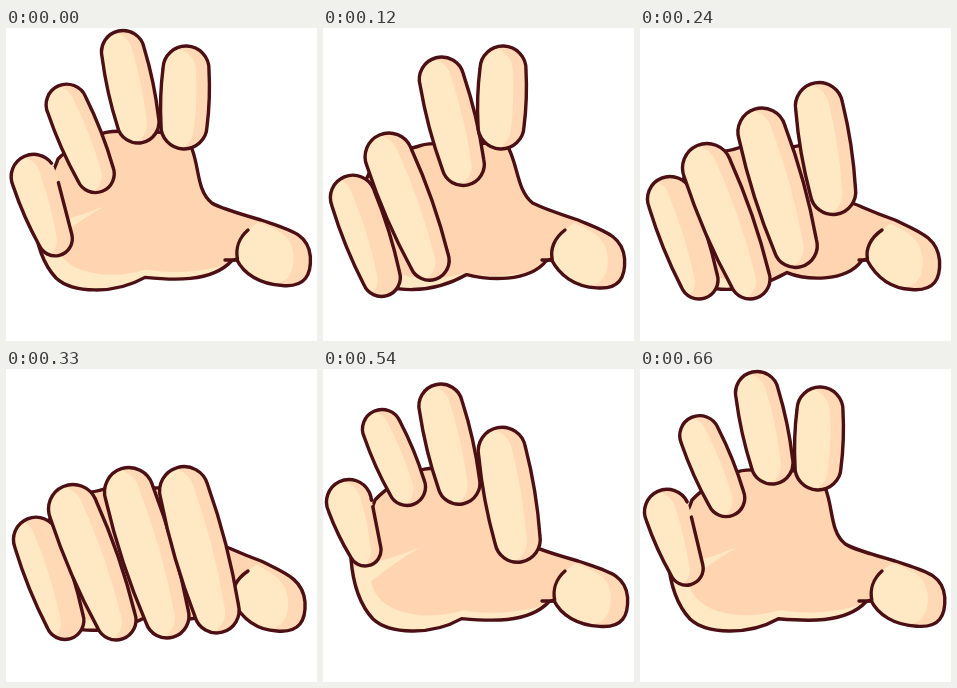
Write an HTML page with a canvas that moves like this. It is 311x313 px and loops after 690 ms.

```html
<!DOCTYPE html>
<html lang="en">
<head>
<meta charset="utf-8">
<title>Beckoning hand</title>
<style>
html, body { margin: 0; overflow: hidden; background: #fff; }
canvas { display: block; }
</style>
</head>
<body>
<canvas id="stage" width="311" height="313"></canvas>
<script>
const ctx = document.getElementById('stage').getContext('2d');
const LIGHT = '#ffe9c5', SHADE = '#ffd8b5', SKIN = '#ffd5b1', LINE = '#4b0f14';
const STEPS = 22; // animation steps in one loop

// Open and closed pose: knuckle x, y, radius; tip x, y, radius; shade width.
// closing and opening are the first and last step of each move.
const pinky = {
  open: [26, 133, 22.5, 42, 181, 16, 10], closed: [30, 171, 22.5, 59, 252, 19, 23],
  closing: [-4, 5], opening: [10.8, 14.8], mergesWithPalm: true };
const ring = {
  open: [59, 60, 19.5, 84, 118, 18.5, 12], closed: [67, 140, 24.5, 110, 251, 20, 14],
  closing: [-2.5, 6], opening: [11, 16] };
const middle = {
  open: [117, 24, 21.5, 132, 94, 21, 12], closed: [123, 123, 24.5, 161, 247, 22, 14],
  closing: [.3, 11], opening: [11.9, 18.5] };
const index = {
  open: [180, 41, 23, 178, 98, 23, 13], closed: [178, 123, 24.5, 211, 243, 22.5, 14],
  closing: [5, 11.4], opening: [13.2, 20.8] };

function ramp([from, to], step) {
  const u = Math.min(1, Math.max(0, (step - from) / (to - from)));
  return u * u * (3 - 2 * u);
}

// 0 is stretched out, 1 is folded; a closing move may begin in the previous loop
const curl = ({ closing, opening }, step) =>
  ramp(closing, step) - ramp(opening, step) + ramp(closing, step - STEPS);

function shadedFill(shape, dx, dy) {
  ctx.save();
  ctx.clip(shape);
  ctx.fillStyle = SHADE;
  ctx.fill(shape);
  ctx.translate(dx, dy);
  ctx.fillStyle = LIGHT;
  ctx.fill(shape);
  ctx.restore();
}

function drawFinger(finger, step) {
  const amount = curl(finger, step);
  const [x, y, r, tx, ty, tr, shade] =
    finger.open.map((v, i) => v + (finger.closed[i] - v) * amount);
  const length = Math.hypot(tx - x, ty - y), axis = Math.atan2(ty - y, tx - x);
  const spread = Math.acos((r - tr) / length);
  const right = axis - spread, left = axis + spread;
  const bulge = length * .045;

  // Control point that makes a side swell slightly
  const side = angle => {
    const reach = (r + tr) / 2 + bulge;
    return [(x + tx) / 2 + reach * Math.cos(angle), (y + ty) / 2 + reach * Math.sin(angle)];
  };
  const onCircle = (cx, cy, cr, angle) => [cx + cr * Math.cos(angle), cy + cr * Math.sin(angle)];

  const shape = new Path2D();
  shape.arc(x, y, r, left, right + 2 * Math.PI);
  shape.quadraticCurveTo(...side(right), ...onCircle(tx, ty, tr, right));
  shape.arc(tx, ty, tr, right, left);
  shape.quadraticCurveTo(...side(left), ...onCircle(x, y, r, left));
  shape.closePath();
  shadedFill(shape, -shade, 2);
  if (!finger.mergesWithPalm || amount > .8) return ctx.stroke(shape);

  // Leave the outline open where the palm meets the knuckle
  const [ax, ay] = onCircle(x, y, r, right), [bx, by] = onCircle(tx, ty, tr, right);
  ctx.beginPath();
  ctx.moveTo(ax + (bx - ax) * .18, ay + (by - ay) * .18);
  ctx.arc(tx, ty, tr, right, left);
  ctx.quadraticCurveTo(...side(left), ...onCircle(x, y, r, left));
  ctx.arc(x, y, r, left, 2 * Math.PI + Math.atan2(131 - y, 51 - x));
  ctx.stroke();
}

function drawPalm(step) {
  const k = (curl(ring, step) + curl(middle, step)) / 2;
  const drop = 19 * curl(ring, step);
  const pt = (x, y, dx, dy) => `${x + dx * k} ${y + dy * k} `;
  const tip = (x, y) => pt(x, y, -6, 5);
  const crease = `M242 202C${pt(233, 210, -3, 0)}${pt(230, 221, -5, 0)}${pt(232, 231, -5, 0)}`;
  const thumb = `C${pt(238, 246, -3, 2)}${tip(255, 256)}${tip(277, 257)}` +
    `C${tip(300, 259)}${tip(306, 246)}${tip(305, 228)}` +
    `C${tip(303, 205)}${pt(285, 202, -6, 2)}255 192`;
  const palm = new Path2D(`M28 190C30 215 36 235 50 250C66 265 108 267 ${pt(138, 250, 10, -6)}
    C165 252 205 255 ${pt(226, 233, -5, 0)}L${pt(231, 231, -5, 0)}${thumb}
    C${pt(230, 185, 0, -2)}${pt(212, 180, 10, -2)}${pt(205, 175, 8, 0)}
    C${pt(190, 163, 8, 0)}${pt(193, 140, 4, 0)}186 121
    C178 110 160 ${100 + drop} 150 ${100 + drop}S110 ${97 + drop} 98 ${101 + drop}
    C80 ${108 + drop} 62 120 52 131C46 150 30 172 28 190Z`);
  ctx.fillStyle = SKIN;
  ctx.fill(palm);

  ctx.save();
  ctx.clip(palm);
  ctx.translate(0, 8 * k);
  ctx.fillStyle = LIGHT;
  ctx.fill(new Path2D(`M97 178Q70 194 48 212Q52 232 75 241Q105 251 140 241Q185 248 226 234
    L226 270H20V200Q60 193 97 178Z`));
  ctx.restore();

  shadedFill(new Path2D(crease + thumb + 'Z'), -17, -2);
  ctx.stroke(palm);
  ctx.stroke(new Path2D(`${crease}M219 232H${231 - 5 * k}`));
}

function draw(now) {
  const tick = Math.floor(now / 30) % (STEPS + 1);
  const step = tick > 11 ? tick - 1 : tick; // the closed fist holds for two ticks
  ctx.clearRect(0, 0, 311, 313);
  ctx.strokeStyle = LINE;
  ctx.lineWidth = 3.4;
  ctx.lineCap = ctx.lineJoin = 'round';
  drawPalm(step);
  for (const finger of [pinky, ring, middle, index]) drawFinger(finger, step);
}

const start = performance.now();
function loop() {
  draw(performance.now() - start);
  requestAnimationFrame(loop);
}
loop();
</script>
</body>
</html>
```
